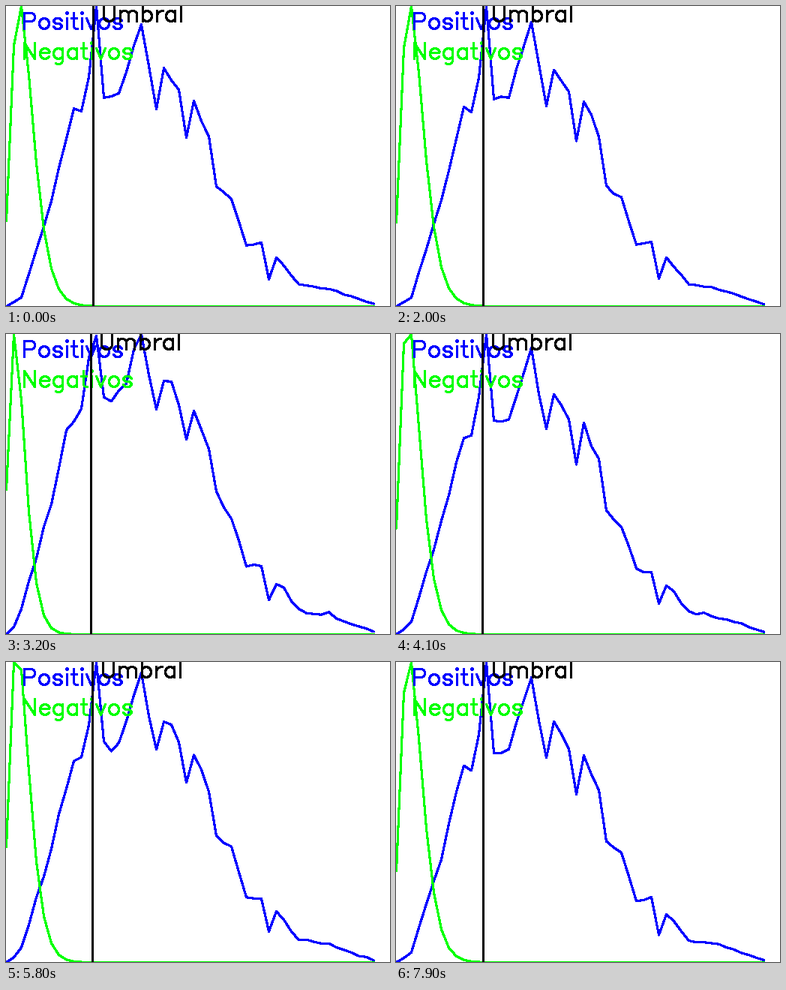
A matplotlib script for the animation above (8000 ms loop, 512 by 400 pixels).

```python
import numpy as np
import matplotlib.pyplot as plt
from matplotlib.animation import FuncAnimation

W, H, DPI = 512, 400, 100
FRAMES, STEP = 80, 100
BINS = 50
BLUE, GREEN, BLACK, GRAY = "#0000ff", "#00ff00", "#000000", "#808080"


def px(width):
    return width * 72 / DPI


# --- single-stroke lettering, y up from the baseline ---
def arc(cx, cy, rx, ry, start, stop):
    a = np.radians(np.linspace(start, stop, 15))
    return list(zip(cx + rx * np.cos(a), cy + ry * np.sin(a)))


def stem(x, top):
    return [(x, top), (x, 0)]


def bowl(start, stop):
    return arc(9.5, 7, 6.5, 7, start, stop)


def hump(x):
    return arc(x + 5.5, 9.5, 5.5, 4.5, 170, 0) + [(x + 11, 0)]


# advance width and strokes of each letter
GLYPHS = {
    "P": (21, [stem(4, 21), [(4, 21)] + arc(13, 15.5, 5, 5.5, 90, -90) + [(4, 10)]]),
    "N": (22, [stem(4, 21), [(4, 21), (18, 0)], stem(18, 21)]),
    "U": (22, [[(4, 21)] + arc(11, 6, 7, 6, 180, 360) + [(18, 21)]]),
    "a": (19, [stem(15, 14), bowl(35, 325)]),
    "b": (19, [stem(4, 21), bowl(145, -145)]),
    "e": (18, [[(3, 8), (15, 8)] + bowl(20, 325)]),
    "g": (19, [[(15, 14)] + arc(9.5, -2, 5.5, 5, 0, -130), bowl(35, 325)]),
    "i": (8, [stem(4, 14), arc(4, 21, 1, 1, 0, 360)]),
    "l": (8, [stem(4, 21)]),
    "m": (30, [stem(4, 14), hump(4), hump(15)]),
    "o": (19, [bowl(0, 360)]),
    "r": (13, [stem(4, 14), arc(12, 7, 8, 7, 170, 90)]),
    "s": (17, [arc(8.5, 10.5, 5.5, 3.5, 10, 270)
               + arc(8.5, 3.5, 5.5, 3.5, 90, -170)]),
    "t": (12, [[(5, 21)] + arc(9, 4, 4, 4, 180, 270) + [(10, 0)],
               [(2, 14), (9, 14)]]),
    "v": (16, [[(2, 14), (8, 0), (14, 14)]]),
}


def lettering(text, x, y):
    """Strokes of a word as x and y arrays, separated by NaN."""
    pts = []
    for ch in text:
        width, strokes = GLYPHS[ch]
        for stroke in strokes:
            pts += [(x + a + 0.5, y - b + 0.5) for a, b in stroke]
            pts.append((np.nan, np.nan))
        x += width
    return np.array(pts).T


# --- two histograms that settle after each restart ---
STARTS = (-60, 28, 49)
XS = np.arange(BINS) * 10.0
RNG = np.random.default_rng(7)
NOISE = RNG.normal(0, 1, (FRAMES, BINS))

# turning points of the settled positives
RIDGE = np.array([
    (0, 400), (20, 389), (60, 262), (90, 137), (100, 145), (110, 100),
    (120, 0), (130, 125), (150, 121), (180, 22), (200, 138), (210, 84),
    (230, 114), (240, 180), (250, 127), (270, 174), (280, 243), (300, 256),
    (320, 319), (340, 316), (350, 365), (360, 335), (390, 371), (430, 377),
    (490, 397)])


def scaled(h):
    return H - h * H / h.max() + 0.5


def positives(young, noise):
    # a young curve rises earlier and has blurred peaks
    shift = 40 * young * XS / 35 * np.exp(1 - XS / 35)
    h = H - np.interp(XS + shift, *RIDGE.T)
    blur = np.convolve(h, [0.25, 0.5, 0.25], "same")
    blur[0] = 0
    h += (blur - h) * np.sqrt(young)
    return scaled(h + noise * np.sqrt(h * H) * (0.004 + 0.035 * np.sqrt(young)))


def negatives(peak):
    r = (XS + 10) / peak
    return scaled((r * np.exp(1 - r)) ** 3.4)


def state(n):
    age = n - max(s for s in STARTS if s < n)
    young = age ** -1.3
    peak = 28.6 - 20.3 * age ** -0.7
    cut = round(116.2 - 20 * young)
    return cut, 26 + 3.5 * peak, positives(young, NOISE[n]), negatives(peak)


fig = plt.figure(figsize=(W / DPI, H / DPI), dpi=DPI, facecolor="white")
ax = fig.add_axes([0, 0, 1, 1])
ax.set(xlim=(0, W), ylim=(H, 0))
ax.axis("off")


def pen(color, width=2.1, xs=(), ys=(), cap="round"):
    line, = ax.plot(xs, ys, color=color, lw=px(width), antialiased=False,
                    solid_capstyle=cap, solid_joinstyle="round")
    return line


pos_line = pen(BLUE)
neg_line = pen(GREEN)
floor = pen(GRAY, 1, cap="butt")
pen(BLUE, 2.1, *lettering("Positivos", 20, 30))
pen(GREEN, 2.1, *lettering("Negativos", 20, 70))
bar = pen(BLACK, 3, cap="butt")
label = pen(BLACK)


def draw(n):
    cut, tail, pos, neg = state(n)
    pos_line.set_data(XS + 0.5, pos)
    neg_line.set_data(XS + 0.5, neg)
    floor.set_data([tail, 491], [H, H])
    bar.set_data([cut, cut], [0, H])
    label.set_data(*lettering("Umbral", cut + 10, 20))
    return pos_line, neg_line, floor, bar, label


anim = FuncAnimation(fig, draw, frames=FRAMES, interval=STEP,
                     repeat=True, repeat_delay=0, blit=False)
plt.show()
```
